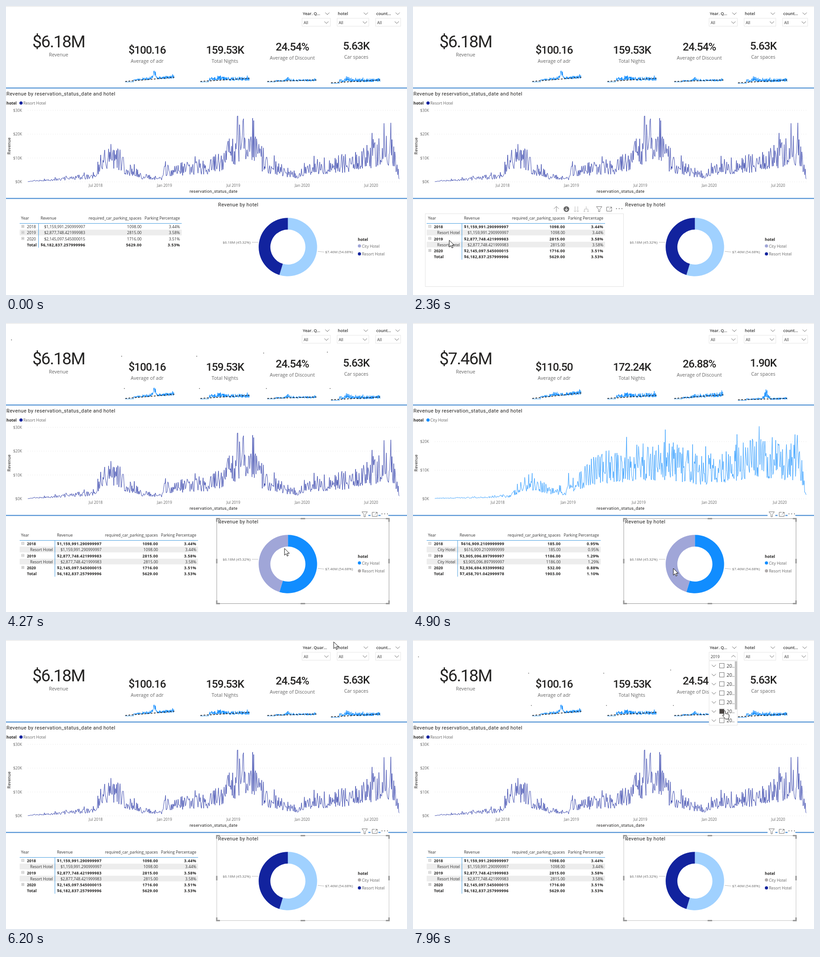
An HTML page that plays this animation: 881 by 636 pixels, repeating every 8 s.

```html
<!DOCTYPE html>
<html lang="en">
<head>
<meta charset="utf-8">
<title>Hotel revenue dashboard</title>
<style>
html, body { margin: 0; width: 100%; height: 100%; overflow: hidden; background: #fff; }
svg { display: block; width: 881px; height: 636px; font: 8.65px "Open Sans", sans-serif; fill: #333; }
path { fill: none; }
.din { font-family: Roboto, sans-serif; fill: #252423; }
.title { font-size: 11px; letter-spacing: .36px; }
.axis { font-size: 9.3px; letter-spacing: .3px; }
.value { font-size: 24px; letter-spacing: -1px; font-weight: 500; }
.big { font-size: 37px; letter-spacing: -1.7px; }
.label { font-size: 10.6px; fill: #666; }
.tick { font-size: 8.3px; fill: #666; }
.share { font-size: 7.95px; fill: #666; }
.key { fill: #666; }
.b { font-weight: 700; fill: #252423; }
.num.b { letter-spacing: .33px; }
.head { font-size: 9px; font-weight: 600; }
.mid { text-anchor: middle; }
.end { text-anchor: end; }
</style>
</head>
<body>
<svg viewBox="0 0 881 636">
  <g id="base"></g><g id="spin"></g><g id="menu"></g>
  <path id="arrow" d="M0 0V15l3.5-3.3 2.3 5.2 2.4-1-2.3-5.1h4.8z" style="fill:#fff;stroke:#111"/>
  <path id="hand" d="M1 0q2-1 2.4 1V6q5 0 8 2.5v5L10 18H3.5L-3 10q1-2 3 0V1z" style="fill:#fff;stroke:#111"/>
</svg>
<script>
const LOOP = 8000, NAVY = '#12239e', BLUE = '#118dff', SKY = '#a0d1ff', LILAC = '#a0a6d8', GREY = '#b0abab', RULE = '#3f86cf';
const ROW = 13.25, SPARK_W = 108, SPARK_X = [262, 427, 574, 714];
const el = id => document.getElementById(id);
const within = (t, a, b) => t >= a && t < b;

const text = (x, y, s, cls = '', extra = '') => `<text x="${x}" y="${y}" class="${cls}" ${extra}>${s}</text>`;
const path = (d, color, w = 1, extra = '') => `<path d="${d}" stroke="${color}" stroke-width="${w}" ${extra}/>`;
const rect = (x, y, w, h, fill, stroke = 'none') => `<rect x="${x}" y="${y}" width="${w}" height="${h}" fill="${fill}" stroke="${stroke}"/>`;
const dot = (x, y, r, fill) => `<circle cx="${x}" cy="${y}" r="${r}" fill="${fill}"/>`;
const chevron = (x, y, up) => path(`M${x - 4.5} ${y + (up ? 2 : -2)}l4.5 ${up ? -4.5 : 4.5} 4.5 ${up ? 4.5 : -4.5}`, '#666');

// Linear interpolation through rows of [position, ...values].
function between(points, p) {
  const i = Math.max(1, points.findIndex(q => q[0] > p)), a = points[i - 1], b = points[i];
  const k = (p - a[0]) / (b[0] - a[0]);
  return a.slice(1).map((v, j) => v + (b[j + 1] - v) * k);
}

// Seeded daily values scattered around level(x), with a rare peak.
function noisy(x0, width, step, bottom, level, seed, spread = 1) {
  let d = '';
  for (let x = 0; x < width; x += step) {
    seed = (seed * 16807) % 2147483647;
    const r = seed / 2147483647;
    const factor = 1 + spread * (1.1 * r ** 1.4 - .5 + (r > .985 ? .25 : 0));
    d += (d ? 'L' : 'M') + (x0 + x).toFixed(1) + ' ' + (bottom - level(x) * factor).toFixed(1);
  }
  return d;
}

// Early days are flat, then a slope from a to b with one bump of height h at c.
const sparkLevel = ([a, b, c, h]) => x =>
  x < 18 ? .8 : a + (b - a) * x / SPARK_W + h * Math.exp(-(((x - c) / 5) ** 2));

const DATA = {
  resort: {
    name: 'Resort Hotel', color: NAVY, dx: 36, childEnd: 103, seed: 77,
    cards: ['$6.18M', '$100.16', '159.53K', '24.54%', '5.63K'],
    rows: [['2018', '$1,159,991.290999997', '1098.00', '3.44%'], ['2019', '$2,877,748.421999983', '2815.00', '3.58%'],
      ['2020', '$2,145,097.545000015', '1716.00', '3.51%'], ['Total', '$6,182,837.257999996', '5629.00', '3.53%']],
    grid: [4, 52.5], months: [197, 151.3],
    level: [[48, 1], [130, 7], [190, 13], [215, 50], [240, 60], [260, 32], [300, 12], [342, 7], [346, 24], [450, 34],
      [480, 52], [510, 80], [520, 98], [545, 94], [562, 42], [620, 20], [645, 12], [655, 28], [770, 44], [835, 72], [850, 70], [865, 4]],
    sparks: [[4, 12, 64, 11], [7, 8, 45, 3], [3, 5, 46, 4], [6, 8, 36, 5]], trendEnd: [157, 159, 163, 163]
  },
  city: {
    name: 'City Hotel', color: BLUE, dx: 26.5, childEnd: 93, seed: 4242,
    cards: ['$7.46M', '$110.50', '172.24K', '26.88%', '1.90K'],
    rows: [['2018', '$616,909.2109999999', '185.00', '0.95%'], ['2019', '$3,905,096.897999997', '1186.00', '1.29%'],
      ['2020', '$2,936,694.933999982', '532.00', '0.88%'], ['Total', '$7,458,701.042999978', '1903.00', '1.10%']],
    grid: [3, 63], months: [186, 155],
    level: [[48, 1], [140, 3], [215, 7], [258, 40], [300, 20], [335, 14], [343, 45], [358, 28], [390, 62], [450, 72],
      [560, 84], [630, 60], [700, 75], [775, 90], [850, 75], [865, 6]],
    sparks: [[4, 15, 50, 3], [6, 10, 45, 3], [2, 11, 46, 2], [3, 5, 62, 12]], trendEnd: [154, 159, 158, 166]
  }
};
for (const d of Object.values(DATA)) d.line = noisy(48, 817, 1.25, 387, x => between(d.level, 48 + x)[0], d.seed);

const CARDS = [[115.5, 91, 'Revenue'], [310, 105, 'Average of adr'], [481, 105, 'Total Nights'],
  [629, 98, 'Average of Discount'], [769.5, 96, 'Car spaces']];
const MONTHS = ['Jul 2018', 'Jan 2019', 'Jul 2019', 'Jan 2020', 'Jul 2020'];

const cards = d => CARDS.map(([x, y, name], i) =>
  text(x, y, d.cards[i], 'din mid ' + (i ? 'value' : 'big')) + text(x, y + 20, name, 'label mid')).join('') +
  SPARK_X.map((x, i) => {
    const bottom = i === 3 ? 171 : 168;
    return path(noisy(x, SPARK_W, .45, bottom, sparkLevel(d.sparks[i]), 91 + i * 17, i ? 1 : .6), BLUE) +
      path(`M${x} ${bottom - 2}L${x + SPARK_W} ${d.trendEnd[i]}`, '#222', 1.5, 'stroke-dasharray="4 3"');
  }).join('');

function chart(d) {
  let out = text(1, 197, 'Revenue by reservation_status_date and hotel', 'din title') +
    text(1, 217, 'hotel', 'b key') + dot(33, 213.5, 3.6, d.color) + text(38, 217, d.name, 'key');
  for (let i = 0; i < d.grid[0]; i++) {
    const y = 387 - i * d.grid[1];
    out += path(`M48 ${y}H866`, '#ddd', 1, 'stroke-dasharray="1 4"') + text(35, y + 3, `$${i * 10}K`, 'tick end');
  }
  return out + path(d.line, d.color, .8, 'stroke-linejoin="round"') +
    MONTHS.map((m, i) => text(d.months[0] + i * d.months[1], 398, m, 'tick mid')).join('') +
    text(456, 411, 'reservation_status_date', 'din axis mid') +
    text(0, 0, 'Revenue', 'din axis mid', 'transform="translate(10 308) rotate(-90)"');
}

function table(d, s) {
  const dx = s.open ? d.dx : 0, right = 386 + dx, split = 71.5 + dx;
  const rows = [];
  d.rows.forEach((r, i) => {
    const isOpen = i < s.open;
    rows.push({ r, bold: s.open || i === 3, icon: i < 3 && (isOpen ? '-' : '+') });
    if (isOpen) rows.push({ r: [d.name, s.open === 1 ? '$1,159,991.291' : r[1], r[2], r[3]], child: true });
  });
  let out = text(33, 470, 'Year') + text(76 + dx, 470, 'Revenue') +
    text(297.5 + dx, 470, 'required_car_parking_spaces', 'end') + text(382 + dx, 470, 'Parking Percentage', 'end');
  rows.forEach(({ r, bold, child, icon }, i) => {
    const y = 489 + i * ROW, cls = 'num end' + (bold ? ' b' : '');
    if (i % 2 && r[0] !== 'Total') out += rect(30, y - 10, right - 30, 12.5, '#ededed');
    if (i === 1 && s.hover) out += rect(31, y - 10, split - 31, 12.5, '#cbcbcb');
    if (i === 3 && s.cell) out += rect(338, y - 10, 84, 12.5, '#d2d2d2');
    if (icon) out += rect(34.5, y - 6.5, 5, 5, '#fff', '#bbb') +
      path(`M35.5 ${y - 4}h3` + (icon === '+' ? 'm-1.5-1.5v3' : ''), '#888', .8);
    out += child ? text(d.childEnd, y, r[0], 'end') : text(46, y, r[0], bold ? 'b' : '');
    [174, 298, 382].forEach((x, k) => out += text(x + dx, y, r[k + 1], cls));
  });
  return out + path(`M30 478.5H${right}M${split} 478.5V${492 + (rows.length - 1) * ROW}`, '#4a9fe0');
}

// Border of a visual; a picked one also gets resize handles.
function frame(x, y, r, b, color, handles) {
  const mx = (x + r) / 2, my = (y + b) / 2;
  return path(`M${x} ${y}H${r}V${b}H${x}z`, color) + (handles ? path(
    `M${x} ${y + 7}V${y}h7M${r - 7} ${y}h7v7M${r} ${b - 7}v7h-7M${x + 7} ${b}h-7v-7` +
    `M${mx - 5} ${y}h10M${mx - 5} ${b}h10M${x} ${my - 5}v10M${r} ${my - 5}v10`, '#999', 3) : '');
}

const tools = (x, y) => [x, x + 22, x + 44].map(v => rect(v - 9, y - 8, 17, 15, '#fff')).join('') +
  path(`M${x - 6} ${y - 5.5}h12l-4.5 6v5h-3v-5z`, '#777') +
  path(`M${x + 22} ${y - 4.5}h-5.5v9h11v-4m-4-5h4v4m0-4l-5 5`, '#777') +
  [38, 44, 50].map(v => dot(x + v, y - 1, 1, '#666')).join('');

const down = (x, y) => `M${x} ${y - 6}v12m-2.5-2.5l2.5 2.5 2.5-2.5`;
const drill = () => path('M315 453V441m-5.5 5.5l5.5-5.5 5.5 5.5', '#888') + dot(337, 447, 6.2, '#666') +
  path('M337 443.5v7m-3-3l3 3 3-3', '#fff', 1.2) +
  path(down(356, 447) + down(362, 447) + 'M380.5 441v6m-4 6v-6h8v6m-10-2l2 2 2-2m4 0l2 2 2-2', '#bbb');

function donut(s) {
  const city = s.pick === 'city', cx = 619.3, cy = 530.5, R = 64.2, r = 38.5, a = 2 * Math.PI * .5468;
  const at = (q, ang) => `${cx + q * Math.sin(ang)} ${cy - q * Math.cos(ang)}`;
  const slice = (from, to, color, big) =>
    `<path d="M${at(R, from)}A${R} ${R} 0 ${big} 1 ${at(R, to)}L${at(r, to)}A${r} ${r} 0 ${big} 0 ${at(r, from)}z" style="fill:${color}"/>`;
  return text(466, 441, 'Revenue by hotel', 'din title') +
    slice(0, a, city ? BLUE : SKY, 1) + slice(a, 2 * Math.PI, city ? LILAC : NAVY, 0) +
    path('M540 520H554M685 540L699 541.5', '#bbb') +
    text(476, 523, '$6.18M (45.32%)', 'share') + text(701, 544, '$7.46M (54.68%)', 'share') +
    text(773, 517, 'hotel', 'b key') +
    dot(776.5, 528, 3.5, city ? BLUE : s.stale ? GREY : LILAC) + text(782, 532, 'City Hotel', 'key') +
    dot(776.5, 545.5, 3.5, city ? GREY : NAVY) + text(782, 549, 'Resort Hotel', 'key');
}

const slicer = (x, w, name, value, up, wide) => text(x + 2, 19.5, name, 'head') + (wide ? '' : chevron(x + w - 6, 16.5)) +
  rect(x + .5, 27, w, 17.5, '#fff', '#e6e6e6') + text(x + 4, 39.5, value) + chevron(x + w - 8, 36, up);

function base(s) {
  const d = DATA[s.data];
  return rect(0, 0, 881, 1.5, '#e9e9e9') + cards(d) + rect(0, 179.5, 881, 2, RULE) + chart(d) +
    rect(0, 422.5, 881, 2, RULE) + table(d, s) +
    (s.tableFrame ? frame(27, 457, 462.5, 617.5, s.tableFrame > 1 ? '#999' : '#e3e3e3', s.tableFrame > 1) + drill() + tools(409, 447) : '') +
    (s.donutFrame ? frame(463, 430.5, 841.5, 617.5, ['', '#e3e3e3', '#c4c4c4', '#999'][s.donutFrame], s.donutFrame > 1) : '') +
    (s.donutFrame > 1 ? tools(788, 421) : '') + donut(s) +
    slicer(650, 62, s.wide ? 'Year. Quar...' : 'Year. Q...', s.year ? '2019' : 'All', s.menu, s.wide) +
    slicer(727, 69.5, 'hotel', 'All') + slicer(811.5, 55, 'count...', 'All');
}

function menu(s) {
  if (!s.menu) return '';
  let out = rect(650.5, 46, 62, 141.5, '#fff', '#e3e3e3') + rect(707, 47, 5, 106, '#c3c3c3');
  for (let i = 0; i < 7; i++) {
    const y = 56.5 + i * 20.1;
    out += chevron(661, y) + rect(673.5, y - 5, 10, 10, s.check && i === 5 ? '#4a4543' : '#fff', '#777') +
      text(689, y + 4, '20..', '', 'style="font-size:10.5px"');
  }
  return out;
}

const stateAt = t => ({
  data: within(t, 4550, 6040) ? 'city' : 'resort',
  pick: within(t, 3700, 5300) ? 'city' : 'resort',
  stale: t >= 3700,
  open: t >= 2150 ? 2 : t >= 950 ? 1 : 0,
  hover: within(t, 1150, 1650),
  cell: within(t, 2850, 3700),
  tableFrame: within(t, 2850, 3700) ? 2 : within(t, 350, 2850) ? 1 : 0,
  donutFrame: t >= 6040 ? 2 : t >= 3700 ? 3 : within(t, 70, 300) ? 1 : 0,
  wide: within(t, 6040, 6300),
  menu: t >= 6890, check: t >= 7630, year: t >= 7960
});

const SPINNERS = [[7, 36], ...SPARK_X.flatMap((x, i) => [[x - 13, CARDS[i + 1][1] - 33], [x - 7, 143]])];
const LINE = [0, 195], RING = [465, 439], GRID = [30, 466];
// start, end, angle at the start, dots, further places
const LOADS = [[2900, 3590, 158, 1, []], [3700, 4550, 167, 1, [LINE, RING]],
  [5400, 6040, 173, 2, [LINE, GRID]], [7960, 8000, 12, 1, [LINE, RING]]];

function spin(t) {
  const load = LOADS.find(l => within(t, l[0], l[1]));
  if (!load) return '';
  const [from, , angle, count, more] = load;
  let out = '';
  for (const [x, y] of SPINNERS.concat(more))
    for (let k = 0; k < count; k++) {
      const a = (angle + (t - from) * .36 - k * 70) * Math.PI / 180;
      out += dot(x + 5.2 * Math.cos(a), y + 5.2 * Math.sin(a), .9, '#555');
    }
  return out;
}

const MOVES = [[70, 600, 560], [560, 60, 540], [810, 36, 486], [1410, 38, 501], [1610, 38, 501], [1680, 37, 513],
  [2300, 40, 514], [2830, 385, 527], [2960, 385, 527], [3240, 720, 520], [3750, 780, 528], [4270, 612, 496],
  [4700, 572, 540], [5300, 572, 540], [5920, 652.5, 191], [6200, 720, 4], [6750, 706, 36], [6900, 706, 36],
  [7500, 683, 156], [8000, 683, 156]];

function pointer(t) {
  const hand = t >= 6900;
  el('arrow').style.display = t < 70 || hand ? 'none' : '';
  el('hand').style.display = hand ? '' : 'none';
  el(hand ? 'hand' : 'arrow').setAttribute('transform', `translate(${between(MOVES, t)})`);
}

let shown = '';
const start = performance.now();
function draw(now) {
  const t = Math.max(0, now - start) % LOOP, s = stateAt(t), key = JSON.stringify(s);
  if (key !== shown) {
    shown = key;
    el('base').innerHTML = base(s);
    el('menu').innerHTML = menu(s);
  }
  el('spin').innerHTML = spin(t);
  pointer(t);
  requestAnimationFrame(draw);
}
draw(start);
</script>
</body>
</html>
```
